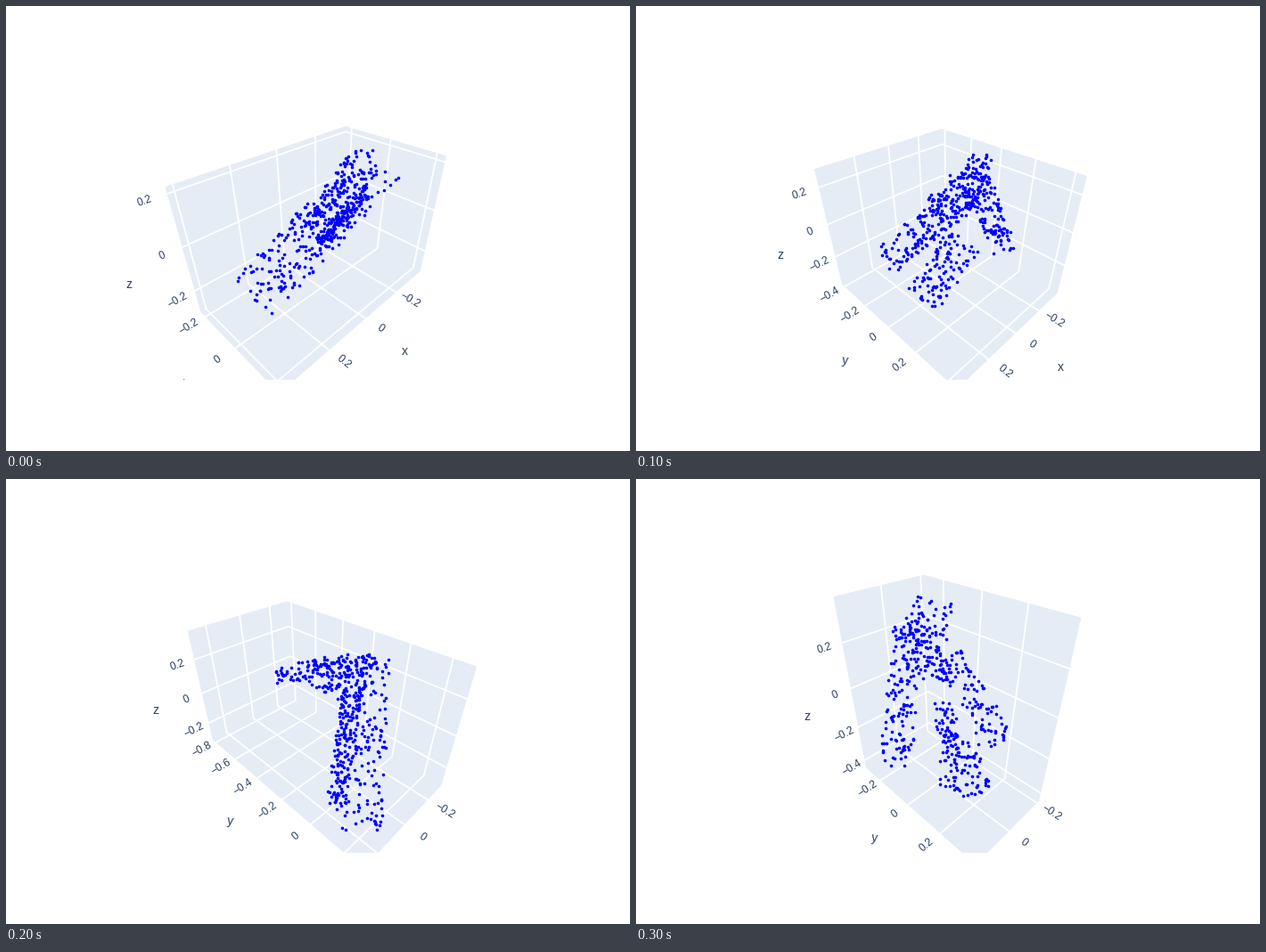
Animation, 700 px wide and 500 px high, one loop 0.4 s. Source, as a matplotlib script:

```python
import numpy as np
import matplotlib.pyplot as plt
from matplotlib.animation import FuncAnimation

W, H, DPI = 700, 500, 100
LEFT, RIGHT, TOP, BOTTOM = 80, 620, 100, 420   # scene area in pixels
FOCAL = (BOTTOM - TOP) / 2 / np.tan(np.pi / 8)
EYE = 1.25 * np.sqrt(3)
WALL, INK, DOT = "#E5ECF6", "#2A3F5F", "#0000FF"
TICK_GAP, TITLE_GAP = 0.117, 0.32
POINTS = 500

plt.rcParams["font.family"] = "Liberation Sans"

# Each pose: data range (low, high) and limbs (start, end, width) on screen
POSES = [
    dict(low=(-0.385, -0.234, -0.3125), high=(0.422, 0.234, 0.222),
         limbs=[((277, 328), (421, 172), 60),
                ((345, 262), (396, 185), 38),
                ((350, 263), (403, 211), 12)]),
    dict(low=(-0.376, -0.425, -0.394), high=(0.399, 0.449, 0.288),
         limbs=[((277, 289), (372, 205), 36),
                ((338, 235), (390, 186), 46),
                ((382, 195), (385, 166), 28),
                ((385, 200), (414, 277), 28),
                ((368, 262), (320, 330), 42)]),
    dict(low=(-0.329, -0.835, -0.324), high=(0.295, 0.297, 0.351),
         limbs=[((303, 219), (415, 207), 22),
                ((345, 212), (398, 245), 34),
                ((402, 198), (394, 395), 56),
                ((388, 240), (370, 366), 22)]),
    dict(low=(-0.217, -0.3175, -0.449), high=(0.199, 0.3845, 0.371),
         limbs=[((333, 133), (325, 225), 46),
                ((308, 150), (346, 225), 24),
                ((306, 165), (291, 324), 36),
                ((350, 200), (412, 296), 32),
                ((347, 250), (354, 358), 26),
                ((366, 285), (386, 353), 28)]),
]


def scatter(limbs, rng):
    """Random points in straight bands, shared out by length."""
    size = [np.hypot(*np.subtract(b, a)) for a, b, _ in limbs]
    parts = []
    for (a, b, width), length in zip(limbs, size):
        along = np.subtract(b, a)
        across = np.array([-along[1], along[0]]) / length * width
        u, v = rng.random((2, round(POINTS * length / sum(size)), 1))
        parts.append(a + u * along + (v - 0.5) * across)
    return np.vstack(parts)


def project(p):
    """Perspective view from the (1, 1, 1) direction, in pixels."""
    x, y, z = np.asarray(p, float).T
    k = FOCAL / (EYE - (x + y + z) / np.sqrt(3))
    return np.array([(LEFT + RIGHT) / 2 + k * (y - x) / np.sqrt(2),
                     (TOP + BOTTOM) / 2 - k * (2 * z - x - y) / np.sqrt(6)]).T


fig = plt.figure(figsize=(W / DPI, H / DPI), dpi=DPI, facecolor="white")
ax = fig.add_axes([LEFT / W, 1 - BOTTOM / H, (RIGHT - LEFT) / W, (BOTTOM - TOP) / H])


def px(n):
    return n * 72 / DPI


def label(pos, text, size, angle=0):
    ax.text(*pos, text, fontsize=px(size), color=INK, rotation=angle,
            ha="center", va="center", clip_on=True, zorder=3)


def others(i):
    return [n for n in range(3) if n != i]


def draw_wall(i, half):
    j, k = others(i)
    quad = np.zeros((4, 3))
    quad[:, i] = -half[i]
    quad[:, j] = half[j] * np.array([-1, 1, 1, -1])
    quad[:, k] = half[k] * np.array([-1, -1, 1, 1])
    ax.fill(*project(quad).T, color=WALL, lw=0.5, zorder=0)


def draw_axis(i, half, unit, zero):
    j, k = others(i)
    base = half * [1, -1 if i == 2 else 1, -1]
    step = np.eye(3)[1 if i == 0 else 0]   # direction in which labels stand off

    for n in range(-5, 6):
        t = zero + 0.2 * n * unit
        if abs(t) > half[i]:
            continue
        path = np.zeros((3, 3))
        path[:, i] = t
        path[:, j] = half[j] * np.array([-1, -1, 1])
        path[:, k] = half[k] * np.array([1, -1, -1])
        ax.plot(*project(path).T, color="white", lw=px(1.8), zorder=1)

        tick = base.copy()
        tick[i] = t
        a, b = project([tick, tick + TICK_GAP * step])
        dx, dy = (b - a) * np.sign(b[0] - a[0])
        text = f"{0.2 * n:.1f}".replace("-", "\u2212") if n else "0"
        label(b, text, 12, np.degrees(np.arctan2(-dy, dx)))

    title = base + TITLE_GAP * step
    title[i] = 0
    label(project([title])[0], "xyz"[i], 14, -8 if i == 1 else 0)


def draw(n):
    ax.clear()
    ax.set(xlim=(LEFT, RIGHT), ylim=(BOTTOM, TOP))
    ax.axis("off")
    pose = POSES[n % len(POSES)]
    low, high = np.array(pose["low"]), np.array(pose["high"])
    unit = 0.5 / np.prod((high - low) / 2) ** (1 / 3)   # box volume is always 1
    half, zero = (high - low) / 2 * unit, -(high + low) / 2 * unit
    for i in range(3):
        draw_wall(i, half)
        draw_axis(i, half, unit, zero[i])
    cloud = scatter(pose["limbs"], np.random.default_rng(n + 3))
    ax.scatter(*cloud.T, s=px(3.6) ** 2, color=DOT, lw=0, zorder=2)


anim = FuncAnimation(fig, draw, frames=len(POSES), interval=100,
                     init_func=lambda: None, repeat=True, repeat_delay=0)
plt.show()
```
